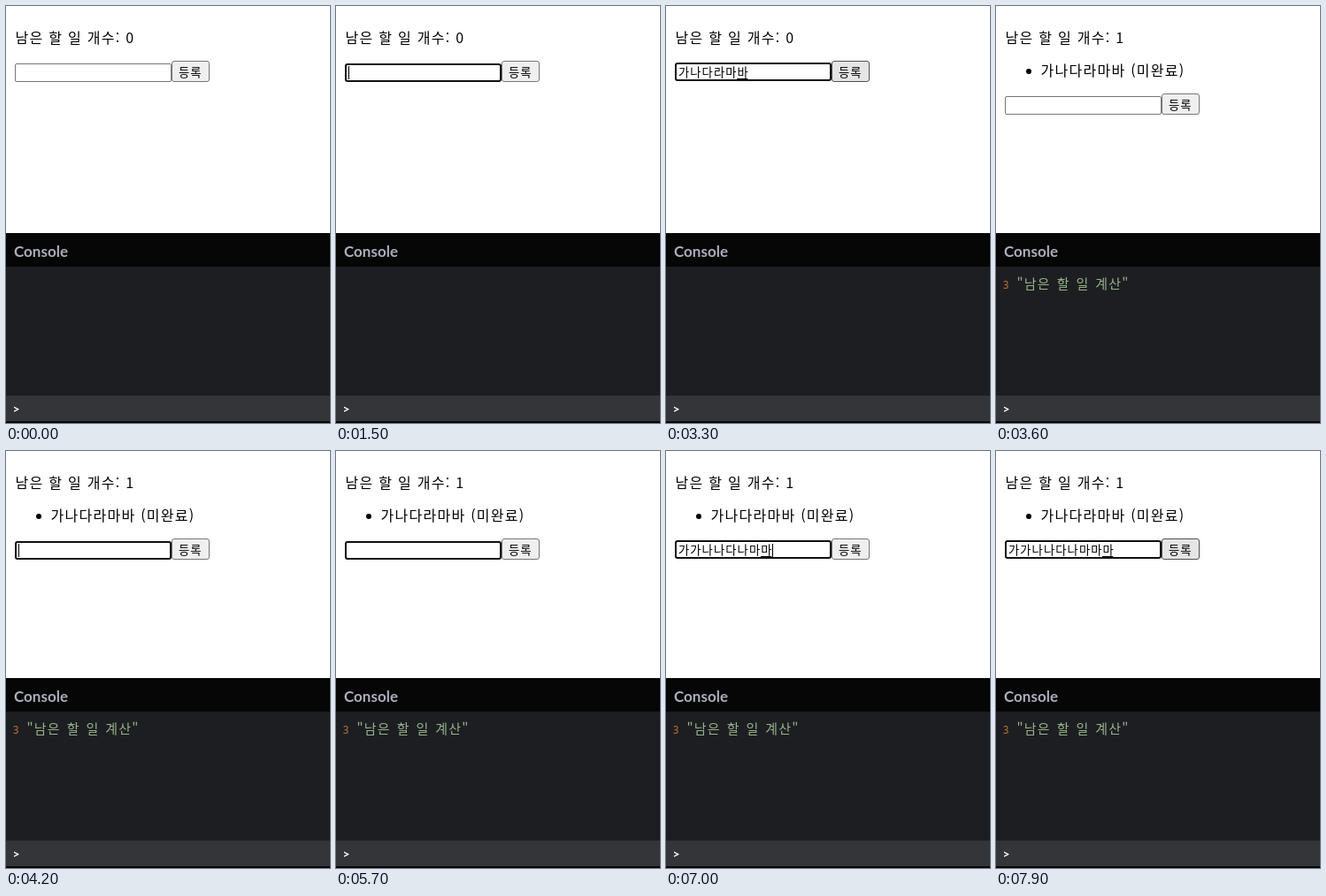
An HTML page for the animation above (8 s loop, 366 by 472 pixels).

```html
<!DOCTYPE html>
<html lang="ko">
<head>
<meta charset="utf-8">
<title>할 일 목록</title>
<style>
  html, body { margin: 0; width: 100%; height: 100%; overflow: hidden; background: #fff; }
  svg { display: block; }
  text { white-space: pre; font-family: "Noto Sans CJK KR", "Noto Sans CJK", "Noto Sans CJK JP", sans-serif; }
  .body { font-size: 16px; font-weight: 300; letter-spacing: 1.28px; }
  .form { font-size: 13.333px; font-weight: 300; letter-spacing: 1.07px; }
  .latin { font: 13.333px "Liberation Sans", Arial, sans-serif; }
  .title { font: bold 17px Lato, sans-serif; fill: #aaaebc; }
  .log { font-size: 15px; font-weight: 300; letter-spacing: 1.2px; word-spacing: 1.4px; fill: #96b38a; }
  .count { font: 12px "Noto Sans Mono", monospace; fill: #bd7130; }
  .prompt { font: bold 14px Lato, sans-serif; fill: #fff; }
</style>
</head>
<body>
<svg width="366" height="472" viewBox="0 0 366 472">
  <rect width="366" height="472" fill="#fff"/>
  <text class="body" x="10.4" y="42">남은 할 일 개수: <tspan id="left">0</tspan></text>
  <g id="item">
    <circle cx="37" cy="74" r="3"/>
    <text class="body" x="50.4" y="79">가나다라마바 (미완료)</text>
  </g>
  <g id="form">
    <rect id="field" x="10" width="177" height="21" fill="#fff"/>
    <text id="value" class="form" x="13.9" y="80"></text>
    <rect id="line" y="82" height="1"/>
    <rect id="caret" y="68" width="1" height="15"/>
    <rect id="button" x="187.5" y="62.5" width="42" height="23" rx="2.5"/>
    <text class="form" x="195" y="80">등록</text>
  </g>
  <rect y="257" width="366" height="215" fill="#060606"/>
  <rect y="295" width="366" height="146" fill="#1d1e22"/>
  <rect y="441" width="366" height="29" fill="#343539"/>
  <text class="title" x="9" y="284">Console</text>
  <g id="log">
    <text class="count" x="7.5" y="320">3</text>
    <text class="log" x="23.5" y="320">"남은 할 일 계산"</text>
  </g>
  <text class="prompt" x="7.5" y="461">&gt;</text>
</svg>
<script>
const LOOP = 8000, CHAR = 13.333, START = 13.9;
const $ = id => document.getElementById(id);
const set = (id, attrs) => {
  for (const key in attrs) $(id).setAttribute(key, attrs[key]);
};
const show = (id, on) => set(id, { visibility: on ? 'visible' : 'hidden' });

const type = (...keys) => keys.map(([t, text]) => [t, { text, caret: true }]);

// Each step changes part of the state from its time on.
const steps = [
  [0, { text: '', caret: false, field: 'idle', button: 'idle', added: false }],
  [200, { field: 'hover' }],
  [400, { field: 'focus', caret: true }],
  [900, { caret: false }],
  ...type([1200, 'r'], [1500, ''], [1700, '가'], [1800, '간'], [1900, '가나'],
    [2100, '가낟'], [2200, '가나다'], [2300, '가나달'], [2400, '가나다라'],
    [2500, '가나다라마'], [2600, '가나다라맙'], [2700, '가나다라마바']),
  [3200, { caret: false }],
  [3300, { button: 'hover' }],
  [3500, { field: 'idle', button: 'press' }],
  [3600, { text: '', button: 'idle', added: true }],
  [3900, { field: 'hover' }],
  [4200, { field: 'focus', caret: true }],
  [4700, { caret: false }],
  [5200, { caret: true }],
  [5700, { caret: false }],
  ...type([6000, '가'], [6100, '각'], [6200, '가가'], [6300, '가가나'],
    [6400, '가가난'], [6500, '가가나나'], [6600, '가가나나다'], [6700, '가가나나단'],
    [6800, '가가나나다나'], [6900, '가가나나다나마'], [7000, '가가나나다나마마'],
    [7200, '가가나나다나마마마']),
  [7700, { caret: false }],
  [7900, { button: 'hover' }]
];

const buttons = {
  idle: { fill: '#efefef', stroke: '#767676' },
  hover: { fill: '#e5e5e5', stroke: '#4f4f4f' },
  press: { fill: '#f5f5f5', stroke: '#8d8d8d' }
};
const borders = { idle: '#767676', hover: '#4f4f4f', focus: '#101010' };

const stateAt = time =>
  Object.assign({}, ...steps.filter(([t]) => t <= time).map(([, change]) => change));

const edge = n => Math.max(14, Math.floor(START + n * CHAR));

function drawField({ text, field, caret }) {
  const focus = field === 'focus', latin = text === 'r';
  const hangul = text !== '' && !latin;
  const w = focus ? 2 : 1, n = text.length;
  // Hangul raises the field by one pixel.
  set('field', {
    x: 10 + w / 2, y: (hangul ? 64 : 65) + w / 2, width: 177 - w, height: 21 - w,
    rx: focus ? 2 : 1.5, stroke: borders[field], 'stroke-width': w
  });
  $('value').textContent = text;
  set('value', { class: latin ? 'latin' : 'form' });
  set('caret', { x: latin ? 18 : edge(n) });
  show('caret', caret && focus);
  set('line', { x: edge(n - 1), width: CHAR - 1 });
  show('line', hangul && focus);
}

function draw(time) {
  const state = stateAt(time);
  drawField(state);
  set('button', buttons[state.button]);
  set('form', { transform: `translate(0 ${state.added ? 37 : 0})` });
  $('left').textContent = state.added ? 1 : 0;
  show('item', state.added);
  show('log', state.added);
}

const begin = performance.now();
function tick() {
  draw((performance.now() - begin) % LOOP);
  requestAnimationFrame(tick);
}
tick();
</script>
</body>
</html>
```
